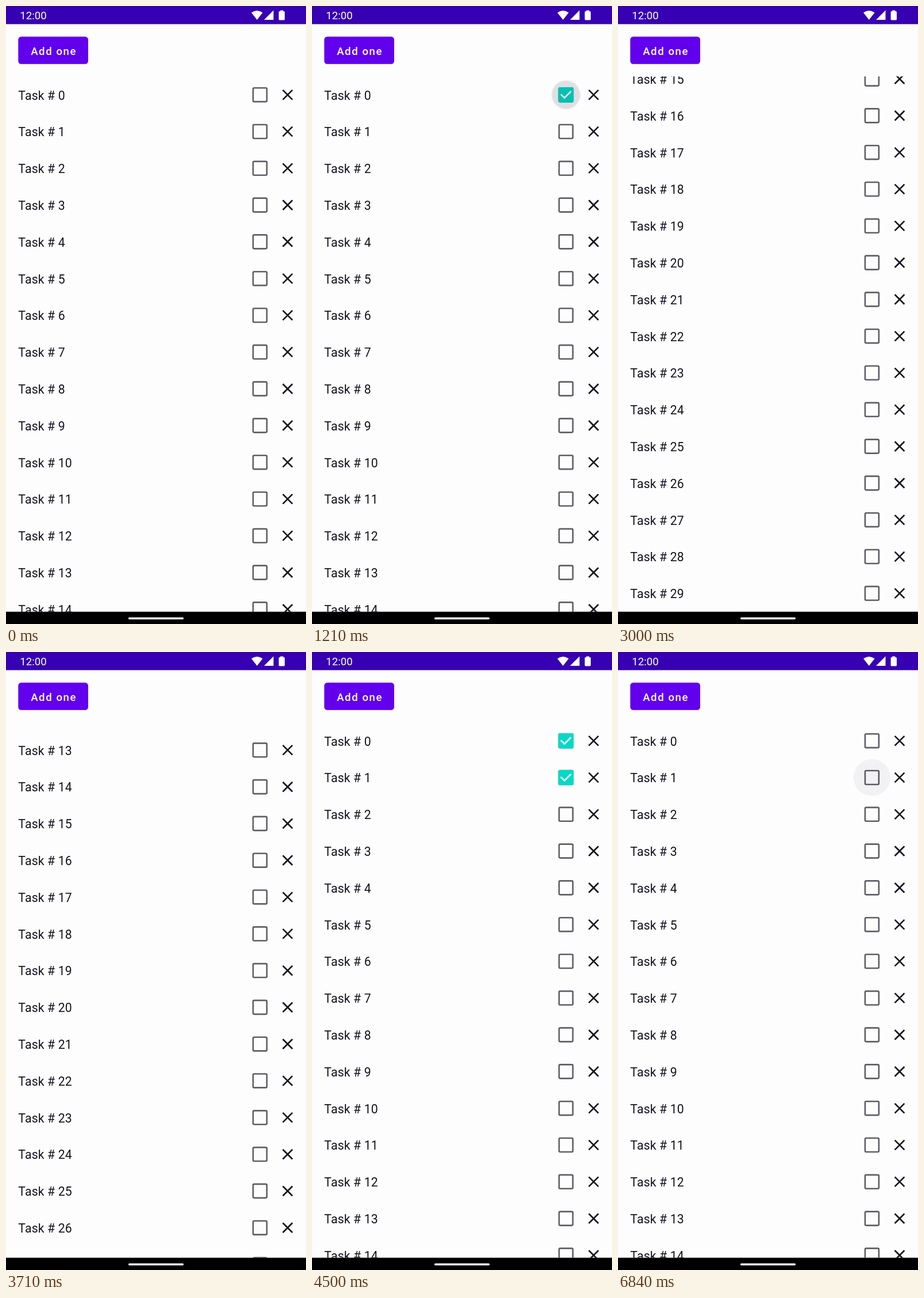
Animation of 522 by 1073 pixels, one loop 6.89 s. Source, as an HTML page with a canvas:

```html
<!DOCTYPE html>
<html lang="en">
<head>
<meta charset="utf-8">
<title>Task list</title>
<style>
  html, body { margin: 0; width: 100%; height: 100%; overflow: hidden; background: #fdfdfe; }
  canvas { display: block; }
</style>
</head>
<body>
<canvas id="stage" width="522" height="1073"></canvas>
<script>
const W = 522, H = 1073, LOOP = 6890;
const DP = W / 392.73;
const ROW = 48 * DP, COUNT = 30, TOP = 122.3, BOTTOM = 1051.7;
const MAX_SCROLL = ROW * COUNT - (BOTTOM - TOP);
const BOX_X = 441.9, CLOSE_X = 490;
const INK = '#14131f', TEAL = '#03dac6', BG = '#fdfdfe';

// Each tap toggles one row and starts a ripple there.
const TAPS = [
  { at: 960, row: 0, on: true },
  { at: 1760, row: 1, on: true },
  { at: 5350, row: 0, on: false },
  { at: 6158, row: 1, on: false },
];

const ctx = document.getElementById('stage').getContext('2d');

const clamp = v => Math.min(1, Math.max(0, v));
const span = (t, from, to) => clamp((t - from) / (to - from));
const smooth = p => p * p * (3 - 2 * p);
const easeInOut = p => p < 0.5 ? 2 * p * p : 1 - 2 * (1 - p) ** 2;

function scrollAt(t) {
  return MAX_SCROLL * (easeInOut(span(t, 2350, 2880)) - easeInOut(span(t, 3560, 4072)));
}

// Fill opacity and tick progress of a row's checkbox.
function checkState(row, t) {
  const tap = TAPS.filter(p => p.row === row && p.at <= t).pop();
  if (!tap) return { fill: 0, tick: 0 };
  const age = t - tap.at;
  return tap.on
    ? { fill: clamp(age / 50), tick: clamp(age / 100) }
    : { fill: 1 - clamp(age / 100), tick: age < 100 ? 1 : 0 };
}

function roundRect(x, y, w, h, r) {
  ctx.beginPath();
  ctx.roundRect(x, y, w, h, r);
}

function polygon(...points) {
  ctx.beginPath();
  points.forEach(([x, y]) => ctx.lineTo(x, y));
  ctx.closePath();
  ctx.fill();
}

function label(text, x, y, size, color, spacing = 0, weight = 400) {
  ctx.font = `${weight} ${size}px Roboto, sans-serif`;
  ctx.letterSpacing = spacing + 'px';
  ctx.fillStyle = color;
  ctx.fillText(text, x, y);
}

function drawTick(x, y, size, progress) {
  const a = [x + 0.2 * size, y + 0.5 * size];
  const b = [x + 0.4 * size, y + 0.7 * size];
  const c = [x + 0.8 * size, y + 0.3 * size];
  const mix = (p, q, k) => [p[0] + (q[0] - p[0]) * k, p[1] + (q[1] - p[1]) * k];
  ctx.strokeStyle = '#fff';
  ctx.lineCap = 'square';
  ctx.beginPath();
  ctx.moveTo(...a);
  ctx.lineTo(...mix(a, b, clamp(progress * 3)));
  if (progress > 1 / 3) ctx.lineTo(...mix(b, c, clamp(progress * 1.5 - 0.5)));
  ctx.stroke();
  ctx.lineCap = 'butt';
}

function drawCheckbox(cy, { fill, tick }) {
  const size = 20 * DP, line = 2 * DP;
  const x = BOX_X - size / 2, y = cy - size / 2;
  ctx.lineWidth = line;
  ctx.strokeStyle = '#605f65';
  roundRect(x + line / 2, y + line / 2, size - line, size - line, line * 0.75);
  ctx.stroke();
  if (fill > 0) {
    ctx.globalAlpha = fill;
    ctx.fillStyle = TEAL;
    roundRect(x, y, size, size, line);
    ctx.fill();
    if (tick > 0) drawTick(x, y, size, tick);
    ctx.globalAlpha = 1;
  }
}

function drawClose(cy) {
  const d = 6.3 * DP;
  ctx.strokeStyle = INK;
  ctx.lineWidth = 2 * DP;
  ctx.beginPath();
  ctx.moveTo(CLOSE_X - d, cy - d);
  ctx.lineTo(CLOSE_X + d, cy + d);
  ctx.moveTo(CLOSE_X + d, cy - d);
  ctx.lineTo(CLOSE_X - d, cy + d);
  ctx.stroke();
}

function drawRipple(cy, age) {
  if (age <= 0 || age >= 825) return;
  const grow = smooth(clamp(age / 430));
  const alpha = 0.12 * clamp(age / 75) * (1 - span(age, 450, 825));
  const radius = 14 + 18 * grow, soft = 6 * (1 - grow);
  const outer = radius + soft / 2;
  const shade = ctx.createRadialGradient(BOX_X, cy, Math.max(0, radius - soft), BOX_X, cy, outer + 0.01);
  shade.addColorStop(0, `rgba(10,8,30,${alpha})`);
  shade.addColorStop(1, `rgba(10,8,30,${grow > 0.97 ? alpha : 0})`);
  ctx.fillStyle = shade;
  ctx.beginPath();
  ctx.arc(BOX_X, cy, outer, 0, Math.PI * 2);
  ctx.fill();
}

function drawList(t) {
  const scroll = scrollAt(t);
  ctx.save();
  ctx.beginPath();
  ctx.rect(0, TOP, W, BOTTOM - TOP);
  ctx.clip();
  for (let i = 0; i < COUNT; i++) {
    const cy = TOP + ROW * (i + 0.5) - scroll;
    if (cy < TOP - ROW || cy > BOTTOM + ROW) continue;
    label('Task # ' + i, 21.3, cy + 8.4, 16 * DP, INK, 0.15);
    drawCheckbox(cy, checkState(i, t));
    drawClose(cy);
    TAPS.forEach(tap => tap.row === i && drawRipple(cy, t - tap.at));
  }
  ctx.restore();
}

function drawStatusBar() {
  ctx.fillStyle = '#3700b3';
  ctx.fillRect(0, 0, W, 31.5);
  label('12:00', 24.3, 23.4, 14 * DP, '#fff');
  // Wi-Fi fan
  ctx.beginPath();
  ctx.moveTo(436.8, 24);
  ctx.lineTo(427, 11.6);
  ctx.quadraticCurveTo(436.8, 4.4, 446.6, 11.6);
  ctx.closePath();
  ctx.fill();
  polygon([449, 24], [465.5, 7.6], [465.5, 24]);
  // Battery
  ctx.fillRect(477.2, 7.6, 5.2, 3);
  roundRect(474.6, 9.2, 10.4, 15.2, 1.4);
  ctx.fill();
}

function drawButton() {
  ctx.fillStyle = '#6200ee';
  roundRect(21.3, 53.2, 121.7, 47.6, 5.2);
  ctx.fill();
  label('Add one', 43.2, 84.6, 14 * DP, '#fff', 1.55, 500);
}

function drawNavBar() {
  ctx.fillStyle = '#000';
  ctx.fillRect(0, BOTTOM, W, H - BOTTOM);
  ctx.fillStyle = '#fff';
  roundRect(213, 1061.5, 96, 3.4, 1.7);
  ctx.fill();
}

function draw(t) {
  ctx.fillStyle = BG;
  ctx.fillRect(0, 0, W, H);
  drawList(t);
  drawButton();
  drawStatusBar();
  drawNavBar();
}

const start = performance.now();
function tick() {
  draw((performance.now() - start) % LOOP);
  requestAnimationFrame(tick);
}
tick();
</script>
</body>
</html>
```
